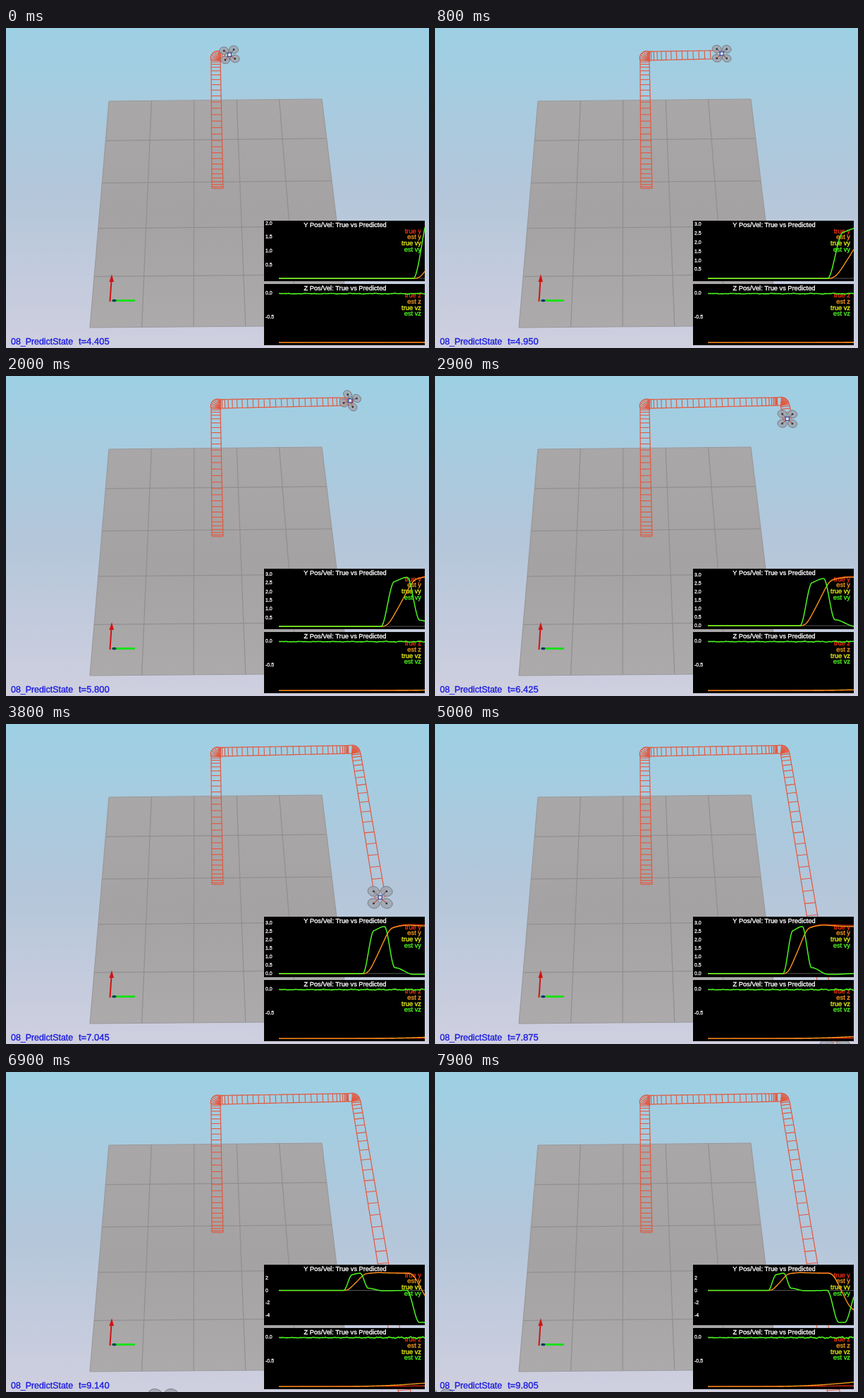
An HTML page with a canvas that plays this animation: 600 by 455 pixels, repeating every 8000 ms.

```html
<!DOCTYPE html>
<html lang="en">
<head>
<meta charset="utf-8">
<title>Flight prediction plot</title>
<style>
  html, body { margin: 0; width: 100%; height: 100%; overflow: hidden; }
  canvas { display: block; }
</style>
</head>
<body>
<canvas id="stage" width="600" height="455"></canvas>
<script>
const ctx = document.getElementById('stage').getContext('2d');
const LOOP = 8000, STEP = 100;
const FONT = '"Liberation Sans", Arial, sans-serif';
const RED = '#f03010', ORANGE = '#f59a1c', YELLOW = '#e8f010', GREEN = '#4cf51e';
const TRAIL = '#e4573e', INK = '#1c1ce0', TICK = '#e8e8e8';

// Playback time in ms against simulated seconds
const CLOCK = [[0, 4.405], [800, 4.95], [2000, 5.8], [5000, 7.875], [7900, 9.805]];

const lerp = (a, b, u) => a + (b - a) * u;
const mid = (p, q) => [(p[0] + q[0]) / 2, (p[1] + q[1]) / 2];
const polar = (x, y, r, a) => [x + r * Math.cos(a), y + r * Math.sin(a)];

// Smooth step from 0 to 1 while x runs from a to b
function ramp(x, a, b) {
  const u = Math.min(1, Math.max(0, (x - a) / (b - a)));
  return u * u * (3 - 2 * u);
}

function simTime(ms) {
  const i = Math.max(1, CLOCK.findIndex(k => k[0] >= ms));
  const [t0, s0] = CLOCK[i - 1], [t1, s1] = CLOCK[i];
  return Math.round(lerp(s0, s1, (ms - t0) / (t1 - t0)) * 200) / 200;
}

// Sideways flight: out, hold, then back
const speed = s => 2.5 * ramp(s, 4.06, 4.58) + .3 * ramp(s, 4.4, 5.1)
  - 2.45 * ramp(s, 5.1, 5.6) - .4 * ramp(s, 5.6, 6.5) + .05 * ramp(s, 6.8, 8)
  - 5.2 * ramp(s, 8.02, 8.8) + 5.2 * ramp(s, 9.2, 10.05);

// Position is the integral of speed.
const DT = .01, pos = [];
for (let i = 0, sum = 0; i <= 990; i++) {
  sum += speed(i * DT) * DT * .98;
  pos.push(sum);
}
function side(s) {
  const f = Math.min(s / DT, pos.length - 1.001), i = Math.floor(f);
  return lerp(pos[i], pos[i + 1], f - i);
}

function line(points, color, width = 1) {
  ctx.beginPath();
  points.forEach(p => ctx.lineTo(...p));
  ctx.strokeStyle = color;
  ctx.lineWidth = width;
  ctx.stroke();
}

function fillShape(points, color) {
  ctx.beginPath();
  points.forEach(p => ctx.lineTo(...p));
  ctx.fillStyle = color;
  ctx.fill();
}

function text(str, x, y, size, color, align = 'left') {
  ctx.font = `${size}px ${FONT}`;
  ctx.textAlign = align;
  ctx.fillStyle = ctx.strokeStyle = color;
  ctx.lineWidth = .35;
  ctx.fillText(str, x, y);
  ctx.strokeText(str, x, y);
}

function shade(y0, y1, ...colors) {
  const g = ctx.createLinearGradient(0, y0, 0, y1);
  colors.forEach((c, i) => g.addColorStop(i / (colors.length - 1), c));
  return g;
}

// Floor position in grid units from 0 to 1; far rows are squeezed.
function floorPoint(u, v) {
  const w = v * (.84 + .16 * v);
  return [lerp(lerp(146, 448, u), lerp(119, 487, u), w), lerp(104, 426, w) - 3 * u];
}

function drawGround() {
  ctx.fillStyle = shade(0, 455, '#9dd0e4', '#b3c6da', '#cfcfdf');
  ctx.fillRect(0, 0, 600, 455);
  fillShape([floorPoint(0, 0), floorPoint(1, 0), floorPoint(1, 1), floorPoint(0, 1)],
    shade(101, 426, '#a9a7a8', '#a4a2a3', '#acaaab'));
  for (let i = 0; i <= 5; i++) {
    const u = i / 5, color = i % 5 ? '#918f91' : '#9b999b';
    line([floorPoint(0, u), floorPoint(1, u)], color, 1.2);
    line([floorPoint(u, 0), floorPoint(u, 1)], color, 1.2);
  }
}

function drawAxes() {
  line([[150, 387.5], [183, 387.5]], '#18e018', 3);
  ctx.fillStyle = '#10306a';
  ctx.beginPath();
  ctx.ellipse(153.5, 387.5, 3, 1.8, 0, 0, 7);
  ctx.fill();
  line([[147.5, 389], [149.5, 359]], '#d01414', 2);
  fillShape([[150, 350], [153, 361], [146.5, 361]], '#d01414');
}

// Climb, then the first turn
const climb = [];
for (let i = 0; i <= 27; i++) {
  const u = i / 27, e = .25 * u + .75 * ramp(u, 0, 1);
  const y = lerp(228, 46, e);
  climb.push([[lerp(292, 291, e), y], [lerp(308, 304, e), y]]);
}
for (let i = 1; i <= 8; i++) {
  const a = Math.PI * (1 + i / 16), bulge = 13.5 + 2.5 * Math.sin(i * Math.PI / 8);
  climb.push([polar(304.5, 47, bulge, a), [304.5, 47]]);
}

const sideX = s => 300 + 66 * side(s);
const depth = s => lerp(41, 470, ramp(s, 6.2, 7.94));

// Trail cross-section at time s: outer and inner end
function rung(s) {
  if (s < 5.7) {
    const x = sideX(s), d = x - 300;
    return [[x, 33.5 - d * .0155], [x + .5, 46 - d * .022]];
  }
  if (s < 6.25) {
    const u = (s - 5.7) / .55;
    return [polar(490.5, 42, 12, lerp(-1.5, -.1, u)), [490.5, 42]];
  }
  const y = depth(s);
  return [[503 + (y - 42) * .172, y - .5], [490 + (y - 40) * .161, y + 1]];
}

function dronePlace(s) {
  const [x, y] = mid(...rung(Math.max(s, 6.25)));
  const out = [sideX(s), 38 - (sideX(s) - 317) * .017];
  const u = ramp(s, 6.15, 6.4);
  const back = s > 8 ? 92 * (side(s) - side(8)) : 0;
  return [lerp(out[0], x + back, u), lerp(out[1], y, u)];
}

function drawDrone(s) {
  const [cx, cy] = dronePlace(s);
  const size = 7 + 4.5 * ramp(s, 6.2, 7.94);
  const yaw = .42 * Math.exp(-(((s - 5.75) / .35) ** 2)) - .12 * (1 - ramp(s, 4.45, 4.9));
  const cos = size * Math.cos(yaw), sin = size * Math.sin(yaw);
  for (const j of [-1, 1]) for (const i of [-1, 1]) {
    const x = cx + i * cos - j * sin, y = cy + i * sin + j * cos * .94;
    ctx.beginPath();
    ctx.ellipse(x, y, size * .92, size * .76, yaw + .25, 0, 7);
    ctx.fillStyle = 'rgba(160,166,175,.85)';
    ctx.fill();
    ctx.strokeStyle = '#767c85';
    ctx.lineWidth = 1;
    ctx.stroke();
    line([[cx, cy], [x, y]], j > 0 ? '#c8513f' : '#70757e', 1.1);
    ctx.fillStyle = '#2c2f36';
    ctx.fillRect(x - 1.2, y - 1.2, 2.4, 2.4);
  }
  ctx.fillStyle = '#e6e8f2';
  ctx.fillRect(cx - 2.5, cy - 2.5, 5, 5);
  ctx.strokeStyle = '#34469a';
  ctx.lineWidth = 1.2;
  ctx.strokeRect(cx - 2.5, cy - 2.5, 5, 5);
}

function drawTrail(now) {
  const rungs = climb.slice(), end = Math.min(now, 8.06);
  for (let s = 4.2; s < end; s += .047) rungs.push(rung(s));
  rungs.push(rung(end));
  rungs.forEach(r => line(r, TRAIL, 1.1));
  for (const k of [0, 1]) line(rungs.map(r => r[k]), TRAIL, 1.2);
}

function panel(top, height, axis, legendTop) {
  ctx.fillStyle = '#000';
  ctx.fillRect(366, top, 228, height);
  text(`${axis.toUpperCase()} Pos/Vel: True vs Predicted`, 481, top + 9, 9.25, '#fff', 'center');
  ['true ', 'est ', 'true v', 'est v'].forEach((label, i) =>
    text(label + axis, 589, legendTop + i * 8.8, 9.3, [RED, ORANGE, YELLOW, GREEN][i], 'right'));
}

function plot(now, value, toY, color, width) {
  const points = [];
  for (let i = 0; i <= 207; i++) points.push([387 + i, toY(value(now * i / 207))]);
  line(points, color, width);
}

function drawSidePlot(now) {
  panel(274, 86, 'y', 291.5);
  let min = 0, max = 0;
  for (let s = 0; s <= now; s += DT) {
    min = Math.min(min, speed(s), side(s));
    max = Math.max(max, speed(s), side(s));
  }
  const span = max - min, toY = v => 356 - (v - min) * 71 / span;
  const tick = span < 3.6 ? .5 : span < 5.5 ? 1 : 2;
  line([[387, toY(0)], [594, toY(0)]], '#5a5a5a');
  for (let v = -6; v <= 4; v += tick) {
    const y = toY(v);
    if (y > 277 && y < 355.5) text(tick < 1 ? v.toFixed(1) : String(v), 368, y + 2.3, 7, TICK);
  }
  const estimate = s => side(s) * (1 - .007 * Math.max(0, s - 4));
  plot(now, side, toY, RED, 1);
  plot(now, estimate, toY, ORANGE, 1.3);
  plot(now, speed, toY, GREEN, 1.5);
}

function drawHeightPlot(now) {
  panel(364, 87, 'z', 383);
  const toY = v => 377.5 - v * 70;
  text('0.0', 368, 379, 7, TICK);
  text('-0.5', 368, 413, 7, TICK);
  const noise = s => (.003 + .0001 * s * s)
    * (Math.sin(s * 9.3) + .7 * Math.sin(s * 23.7 + 1) + .5 * Math.sin(s * 41 + 2)) - .003;
  const drift = s => .0026 * Math.max(0, s - 4) ** 2;
  plot(now, s => -.998 + .0015 * s, toY, RED, 1.2);
  plot(now, s => -.995 + drift(s), toY, ORANGE, 1.4);
  plot(now, noise, toY, GREEN, 1.6);
}

function draw(ms) {
  const now = simTime(ms);
  drawGround();
  drawAxes();
  drawTrail(now);
  drawDrone(now);
  drawSidePlot(now);
  drawHeightPlot(now);
  text('08_PredictState', 7, 450, 12.4, INK);
  text('t=' + now.toFixed(3), 103, 450, 13, INK);
}

let shown = -1;
function tick() {
  const ms = Math.floor(performance.now() % LOOP / STEP) * STEP;
  if (ms !== shown) draw(shown = ms);
  requestAnimationFrame(tick);
}
tick();
</script>
</body>
</html>
```
